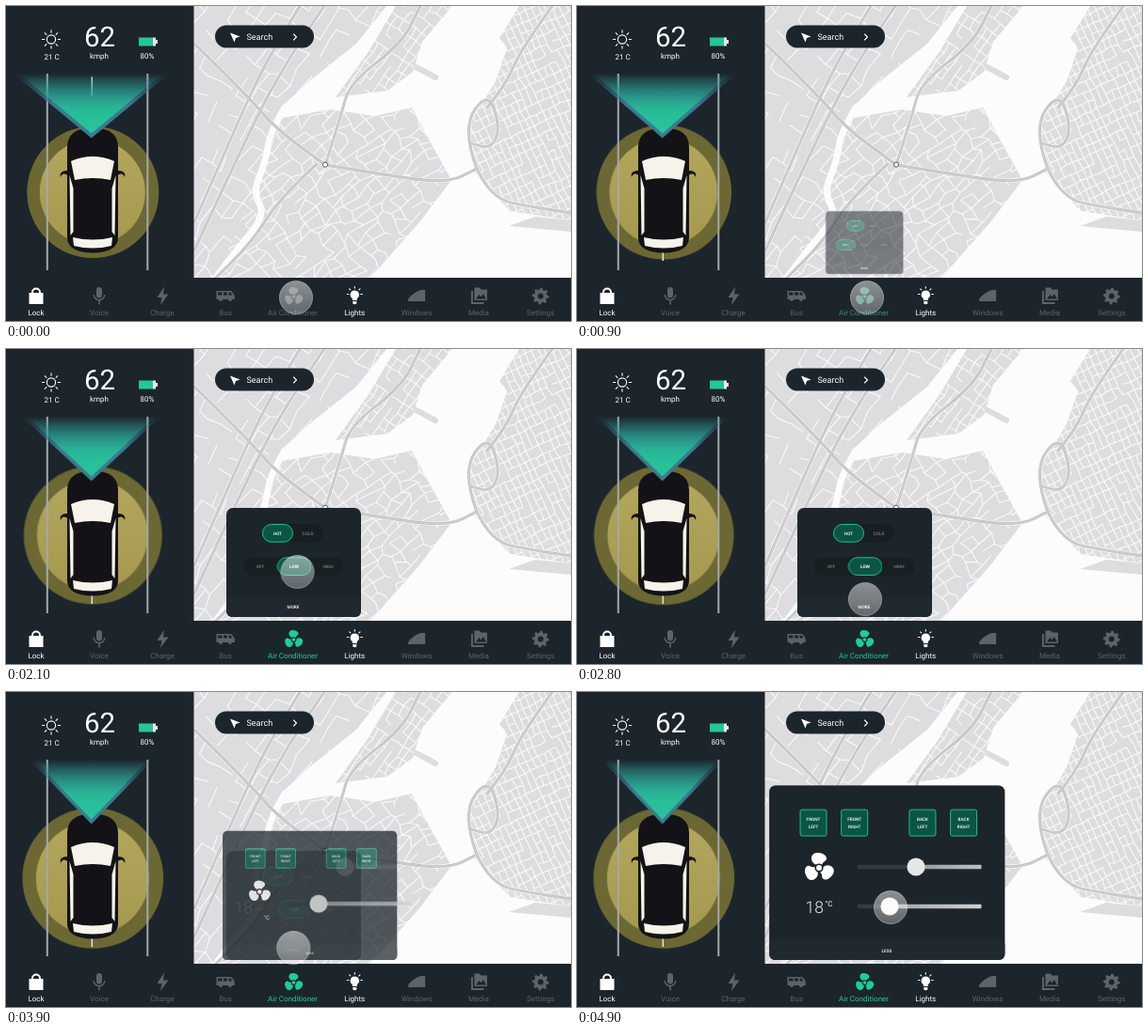
Animation of 600 by 335 pixels, one loop 5 s. Source, as an HTML page with a canvas:

```html
<!DOCTYPE html>
<html lang="en">
<head>
<meta charset="utf-8">
<title>Car dashboard</title>
<style>
html, body { margin: 0; width: 100%; height: 100%; overflow: hidden; background: #1c252c; }
#map, #ui { position: absolute; left: 0; top: 0; width: 600px; height: 335px; display: block; }
text { font-family: Roboto, Arial, sans-serif; font-size: 8px; fill: #fff; text-anchor: middle; text-rendering: geometricPrecision; }
.tiny { font-size: 4.7px; font-weight: 500; }
.dim { fill: #7d8387; }
.nav { fill: #5d6468; }
.nav text { fill: inherit; }
.on { fill: #fff; }
.line { fill: none; stroke: #fff; stroke-width: 1.1; stroke-linecap: round; }
.chip { fill: #0b5545; stroke: #21bd8f; }
.dark { fill: #1c252c; }
.foot { fill: #20292f; }

.move { animation: 5s linear infinite; }
.cone { animation-name: cone; transform-origin: 90.7px 73px; }
.halo { animation-name: halo; transform-origin: 92.3px 198px; }
.dash { animation-name: dash; }
.cursor { animation-name: cursor; }
.small { animation-name: small; transform-origin: 305px 285px; }
.big { animation-name: spring; transform-origin: 304px 285px; }
.pick { animation-name: pick; }
.late { animation-name: late; }
.soon { animation-name: soon; }
.ac { animation-name: ac; }

@keyframes cone { 82%, 100% { transform: scaleX(.785); } }
@keyframes halo { 0% { animation-timing-function: ease-out; } 80%, 100% { transform: scale(1.07); } }
@keyframes dash {
  0%, 20% { transform: none; }
  12%, 19.9%, 40%, 100% { transform: translateY(175px); }
}
@keyframes cursor {
  0%, 18% { transform: translate(308px, 310px); animation-timing-function: ease-in-out; }
  25.5%, 46% { transform: translate(309.5px, 237px); animation-timing-function: ease-in-out; }
  60%, 88% { transform: translate(305.3px, 272px); animation-timing-function: ease-in-out; }
  96%, 100% { transform: translate(333px, 229px); }
}
@keyframes small {
  0%, 14% { transform: scale(.1); opacity: 0; animation-timing-function: ease-out; }
  25%, 73% { transform: none; opacity: 1; }
  82%, 100% { transform: none; opacity: 0; }
}
@keyframes pick {
  0%, 32% { transform: none; animation-timing-function: ease-in-out; }
  42%, 100% { transform: translateX(35.5px); }
}
@keyframes late { 0%, 75.500% { opacity: 0; } 94%, 100% { opacity: .92; } }
@keyframes soon {
  0%, 73% { opacity: 0; transform: translateY(-10px); }
  80%, 100% { opacity: 1; transform: none; }
}
@keyframes ac { 0%, 15% { fill: #5d6468; } 24%, 100% { fill: #20cc9a; } }
</style>
</head>
<body>
<canvas id="map"></canvas>
<svg id="ui" viewBox="0 0 600 335">
  <defs>
    <linearGradient id="beam" x2="0" y2="1">
      <stop stop-color="#22bd95" stop-opacity="0"/>
      <stop offset=".65" stop-color="#26c299" stop-opacity=".92"/>
      <stop offset="1" stop-color="#28c69b"/>
    </linearGradient>
    <linearGradient id="rim" x2="0" y2="1">
      <stop stop-color="#3a7b90" stop-opacity="0"/>
      <stop offset=".5" stop-color="#3a7b90"/>
    </linearGradient>
    <linearGradient id="glow" x2="0" y2="1">
      <stop stop-color="#b3a65d"/><stop offset="1" stop-color="#a5984f"/>
    </linearGradient>
    <linearGradient id="touch" x2="0" y2="1">
      <stop stop-color="#fff" stop-opacity=".5"/><stop offset="1" stop-color="#fff" stop-opacity=".3"/>
    </linearGradient>
    <linearGradient id="bar">
      <stop stop-color="#a2a5a7"/><stop offset="1" stop-color="#cdcfd0"/>
    </linearGradient>
    <clipPath id="pill"><rect class="move pick" x="253" y="221.800" width="35.500" height="18.700"/></clipPath>
    <path id="blade" d="M-2-3C-10-5-10-15-3-16 6-17 11-10 6-7Q4-6 3-3Z"/>
    <g id="fan">
      <use href="#blade"/><use href="#blade" transform="rotate(120)"/><use href="#blade" transform="rotate(240)"/>
      <circle r="4.600" class="dark"/><circle r="3"/>
    </g>
  </defs>

  <path class="dark" d="M0 0H199.500V289H600V335H0Z"/>

  <!-- status -->
  <circle class="line" cx="48" cy="35.500" r="4.600"/>
  <path class="line" id="sun"/>
  <text x="48.500" y="57">21 C</text>
  <text x="99.500" y="42.500" style="font-size:29.500px">62</text>
  <text x="99" y="56">kmph</text>
  <path fill="#25c698" d="M141 33.500H156V42.500H141Z"/>
  <path fill="#e8eaea" d="M156 33.500H159V36H161V40H159V42.500H156Z"/>
  <text x="150" y="56">80%</text>

  <!-- road and car -->
  <g class="move halo">
    <circle cx="92.300" cy="198" r="70" fill="#6c6833"/>
    <circle cx="91.800" cy="198" r="56" fill="url(#glow)"/>
  </g>
  <path d="M43.800 72V281M150.300 72V281" stroke="#a4a9ac" stroke-width="2"/>
  <path class="move dash" d="M91.300 75V96" stroke="#dfe4e4" stroke-width="1.500"/>
  <g fill="#131216">
    <path d="M65 150Q65 130 92 129.500 119 130 119 150V246Q119 262 92 262.500 65 262 65 246Z"/>
    <path d="M66 180Q60 176 58 182 56 175 66 175ZM118 180Q124 176 126 182 128 175 118 175Z"/>
    <g fill="#f5f3ea">
      <path d="M69 165Q92 155 115 165L111 185Q92 181 73 185Z"/>
      <path d="M67.500 180L71.500 194V240L68.500 244ZM116.500 180L112.500 194V240L115.500 244Z"/>
      <path d="M71 246Q92 251 113 246L112 255Q92 260 72 255Z"/>
    </g>
  </g>
  <g class="move cone">
    <path fill="url(#rim)" d="M8 72H173L90.700 140.500Z"/>
    <path fill="url(#beam)" d="M14 72H167L90.700 135.500Z"/>
  </g>

  <!-- search -->
  <rect class="dark" x="222" y="20.500" width="105" height="24" rx="12"/>
  <path fill="#fff" d="M238 28.500L248.500 32.500 244 34 242.500 38.500Z"/>
  <text x="269.300" y="36" style="font-size:9px">Search</text>
  <path class="line" d="M305.500 30L308.500 33 305.500 36"/>

  <!-- climate, short form -->
  <g class="move small">
    <rect class="dark" x="234" y="169" width="143" height="116" rx="7"/>
    <rect class="foot" x="234" y="263" width="143" height="22" rx="6"/>
    <g fill="#181f23">
      <rect x="272" y="186" width="65" height="19.500" rx="9.700"/>
      <rect x="251.500" y="221.500" width="107" height="19.500" rx="9.700"/>
    </g>
    <rect class="chip" x="272.500" y="186.500" width="32" height="18.700" rx="9.300"/>
    <rect class="chip move pick" x="253" y="221.800" width="35.500" height="18.700" rx="9.300"/>
    <text class="tiny" x="288.500" y="197.500">HOT</text>
    <text class="tiny dim" x="320.500" y="197.500">COLD</text>
    <g id="speeds"></g>
    <g id="picked" clip-path="url(#pill)"></g>
    <text class="tiny" x="305" y="275.500">MORE</text>
  </g>

  <!-- climate, full form -->
  <g class="move big">
    <rect class="dark" x="204" y="99" width="250.500" height="186" rx="7"/>
    <rect class="foot" x="204" y="263" width="250.500" height="22" rx="6"/>
    <g id="doors"></g>
    <use href="#fan" x="257" y="187" fill="#fff"/>
    <text x="267.300" y="227.500">°C</text>
    <text class="tiny" x="329" y="276.500">LESS</text>
  </g>
  <text class="move late" x="252.300" y="234.500" style="font-size:17.500px;font-weight:300">18</text>
  <g class="move late" id="fan-slider"></g>
  <g class="move soon" id="temp-slider"></g>

  <g id="nav"></g>
  <circle class="move cursor" r="17.600" fill="url(#touch)" stroke="#fff" stroke-opacity=".45" stroke-width=".8"/>
</svg>
<script>
const $ = id => document.getElementById(id);
function add(parent, tag, attrs, label) {
  const el = document.createElementNS('http://www.w3.org/2000/svg', tag);
  for (const k in attrs) el.setAttribute(k, attrs[k]);
  if (label) el.textContent = label;
  return parent.appendChild(el);
}

// The full climate panel opens on a damped spring.
function spring(t) {
  if (t < 0) return 0;
  const decay = 6.05, freq = 5.71;
  return 1 - Math.exp(-decay * t) * (Math.cos(freq * t) + decay / freq * Math.sin(freq * t));
}
let frames = '';
for (let p = 0; p <= 100; p++) {
  const s = spring(p / 20 - 3.65);
  frames += `${p}% { transform: scale(${s.toFixed(4)}); opacity: ${Math.min(1, s).toFixed(3)}; }`;
}
document.head.appendChild(document.createElement('style')).textContent = `@keyframes spring { ${frames} }`;

function rays(x, y, inner, outer, count, total = 8, start = 0) {
  let d = '';
  for (let i = 0; i < count; i++) {
    const a = start + i * 2 * Math.PI / total, c = Math.cos(a), s = Math.sin(a);
    d += `M${x + inner * c} ${y + inner * s}L${x + outer * c} ${y + outer * s}`;
  }
  return d;
}
$('sun').setAttribute('d', rays(48, 35.5, 7.2, 9.6, 8));

['OFF', 'LOW', 'HIGH'].forEach((label, i) => {
  const at = { x: 270 + 36 * i, y: 232.7 };
  add($('speeds'), 'text', { ...at, class: 'tiny dim' }, label);
  add($('picked'), 'text', { ...at, class: 'tiny' }, label);
});

['FRONT', 'BACK'].forEach((row, i) => ['LEFT', 'RIGHT'].forEach((side, j) => {
  const x = 251 + 116 * i + 43.7 * j;
  add($('doors'), 'rect', { x: x - 14, y: 125, width: 28, height: 28, rx: 2, class: 'chip' });
  add($('doors'), 'text', { x, y: 137, class: 'tiny' }, row);
  add($('doors'), 'text', { x, y: 144.5, class: 'tiny' }, side);
}));

function slider(group, x, y) {
  const bar = { y: y - 2.3, height: 4.6, rx: 1 };
  add(group, 'rect', { ...bar, x: 298, width: x - 298, fill: '#363d43' });
  add(group, 'rect', { ...bar, x, width: 429.5 - x, fill: 'url(#bar)' });
  add(group, 'circle', { cx: x, cy: y, r: 9.6, fill: '#f8f8f8' });
}
slider($('fan-slider'), 360, 186);
slider($('temp-slider'), 332, 228);

// Navigation
function gear() {
  let d = '';
  for (let i = 0; i < 32; i++) {
    const r = i % 4 < 2 ? 9 : 6.8, a = i * Math.PI / 16;
    d += `${i ? 'L' : 'M'}${r * Math.cos(a)} ${r * Math.sin(a)}`;
  }
  return d + 'ZM-3 0a3 3 0 1 0 6 0a3 3 0 1 0-6 0Z';
}
const icons = {
  'Lock': 'M-7.5-3.5H-5V-4A5 5 0 0 1 5-4V-3.5H7.5V8.5H-7.5ZM-3-3.5H3V-4A3 3 0 0 0-3-4Z',
  'Voice': 'M-3-6.5a3 3 0 0 1 6 0V-1a3 3 0 0 1-6 0ZM-6.5-1.5H-5a5 5 0 0 0 10 0H6.5A6.5 6.5 0 0 1 .8 4.8V9H-.8V4.8A6.5 6.5 0 0 1-6.5-1.5Z',
  'Charge': 'M2-10L-5.5 1.5H-.5L-2 9.5 6.5-2H1Z',
  'Bus': 'M-9.5-5.5H6Q9-3 9.8 0V3.5H-9.5ZM-8-4H-3.5V-1H-8ZM-2-4H2V-1H-2ZM3.5-4H5.5L7.5-1H3.5ZM-7 3.5a2 2 0 0 0 4 0ZM3 3.5a2 2 0 0 0 4 0Z',
  'Air Conditioner': '',
  'Lights': 'M0-6A4.6 4.6 0 0 1 2.5 2.5V4.5H-2.5V2.5A4.6 4.6 0 0 1 0-6ZM-2 5.5H2V8Q0 9.5-2 8Z',
  'Windows': 'M-9 5.5V3Q-2-5.5 5-6.5H9V5.5Z',
  'Media': 'M-8-5.5H-6V6.5H5.5V8.5H-8ZM-4.5-9H1L2.5-7H9V4.5H-4.5ZM-3 3L.5-1.5 2.5.8 5-2.5 8 3Z',
  'Settings': gear()
};
Object.keys(icons).forEach((label, i) => {
  const x = 32 + 67 * i + (i > 3 ? 4.5 - (i - 4) * 1.2 : 0);
  const lit = label === 'Lock' || label === 'Lights', cool = label === 'Air Conditioner';
  const item = add($('nav'), 'g', {
    class: 'nav' + (lit ? ' on' : '') + (cool ? ' move ac' : ''),
    transform: `translate(${x} 308.5)`
  });
  if (cool) add(item, 'use', { href: '#fan', transform: 'translate(1 .5) scale(.62)' });
  else add(item, 'path', { d: icons[label], 'fill-rule': 'evenodd' });
  if (label === 'Lights') add(item, 'path', { class: 'line', d: rays(0, -2, 6.4, 8, 5, 8, Math.PI) });
  add(item, 'text', { y: lit ? 20.8 : 20 }, label);
});

// Street map
const map = $('map'), k = Math.max(1, window.devicePixelRatio || 1);
map.width = 600 * k;
map.height = 335 * k;
const g = map.getContext('2d');
g.scale(k, k);
g.fillStyle = '#fdfcfd';
g.fillRect(0, 0, 600, 335);
g.lineJoin = g.lineCap = 'round';

let seed = 41;
const rnd = () => (seed = (seed * 16807) % 2147483647) / 2147483647;

function outline(p) {
  g.beginPath();
  for (let i = 0; i < p.length; i += 2) g.lineTo(p[i], p[i + 1]);
  g.closePath();
}
function curve(p, color, width) {
  const n = p.length;
  g.beginPath();
  g.moveTo(p[0], p[1]);
  for (let i = 2; i < n - 2; i += 2)
    g.quadraticCurveTo(p[i], p[i + 1], (p[i] + p[i + 2]) / 2, (p[i + 1] + p[i + 3]) / 2);
  g.lineTo(p[n - 2], p[n - 1]);
  g.strokeStyle = color;
  g.lineWidth = width;
  g.stroke();
}
// A jittered lattice whose neighbours are joined at random.
function streets(area, angle, gap, keep, jitter) {
  const n = Math.ceil(320 / gap), node = [];
  for (let i = -n; i <= n; i++)
    for (let j = -n; j <= n; j++)
      node.push([(i * 1.5 + (rnd() - .5) * jitter) * gap, (j + (rnd() - .5) * jitter) * gap]);
  g.save();
  outline(area);
  g.clip();
  g.translate(400, 145);
  g.rotate(angle * Math.PI / 180);
  g.strokeStyle = '#fbfafb';
  g.lineWidth = 1.1;
  g.beginPath();
  const row = 2 * n + 1;
  node.forEach((a, i) => [i + 1, i + row].forEach(next => {
    const b = node[next];
    if (!b || (next === i + 1 && next % row === 0) || rnd() > keep) return;
    g.moveTo(...a);
    g.lineTo(...b);
  }));
  g.stroke();
  g.restore();
}

const west = [199,0, 404,0, 372,40, 322,80, 296,104, 294,119, 262,200, 222,290, 199,290];
const neck = [414,0, 474,0, 442,38, 432,70, 405,90, 350,97, 384,50];
const island = [294,119, 344,110, 392,117, 431,108, 448,140, 473,185, 439,230, 386,290, 222,290, 262,200];
const east = [545,0, 600,0, 600,228, 535,218, 498,178, 489,130, 520,80, 532,45, 524,34];
const shore = [534,234, 562,224, 600,228, 600,240];
[west, neck, island, east, shore].forEach(area => {
  outline(area);
  g.fillStyle = '#dddcde';
  g.fill();
});
curve([412,54, 434,64, 456,76], '#dddcde', 6);

streets(west, -58, 13, .5, .5);
streets(neck, -55, 8, .75, .3);
streets(island, -38, 9.5, .72, .9);
streets(east, 65, 7, .85, .3);

curve([296,108, 280,135, 276,165, 262,198, 276,222, 243,262, 222,290], '#fdfcfd', 7);

const roads = [
  [200,230, 248,119, 276,60, 312,0],
  [200,260, 262,125, 300,56, 338,0],
  [200,40, 259,98, 286,130, 339,169],
  [339,169, 386,177, 468,189, 500,173],
  [339,169, 355,119, 365,82, 420,40, 440,0],
  [330,168, 290,205, 262,250, 222,290],
  [500,173, 484,130, 512,90, 525,130, 515,152, 494,146],
  [511,108, 530,85, 545,50, 580,0],
  [500,173, 515,205, 560,214, 600,220]
];
[['#f6f6f6', 4.2], ['#c2c2c4', 2.8], ['#d8d8da', .7]]
  .forEach(([color, width]) => roads.forEach(r => curve(r, color, width)));

g.beginPath();
g.arc(339, 168.7, 2.6, 0, 7);
g.fillStyle = '#fff';
g.fill();
g.strokeStyle = '#555a5e';
g.lineWidth = 1;
g.stroke();
</script>
</body>
</html>
```
